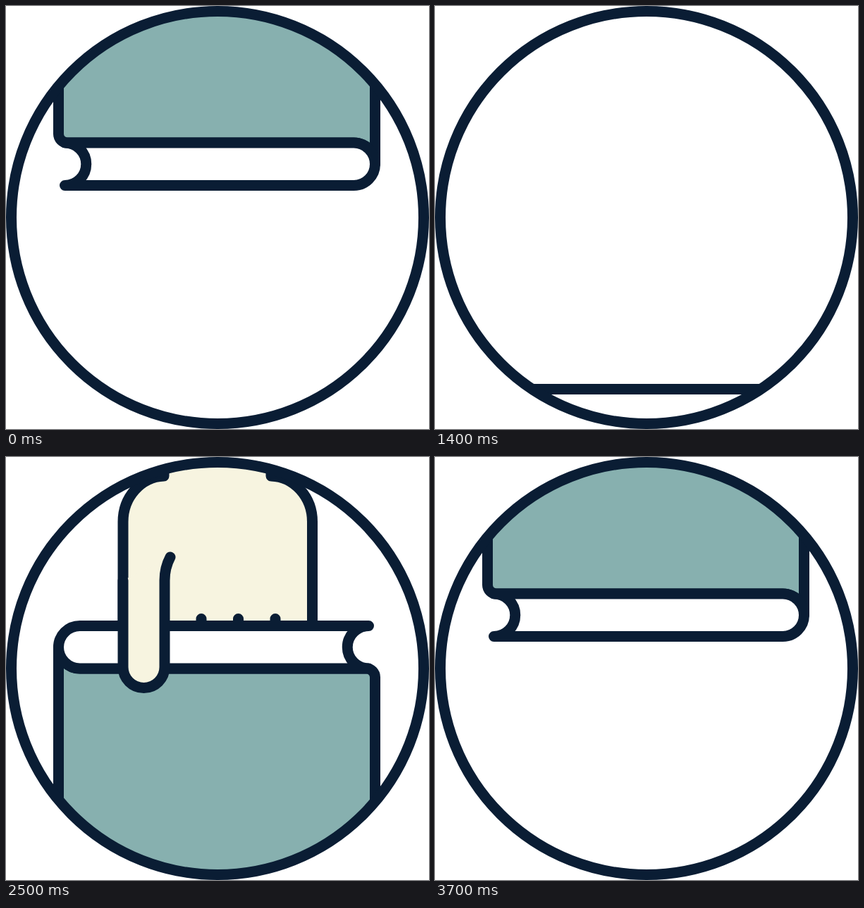
An HTML page for the animation above (3.8 s loop, 600 by 600 pixels).

```html
<!DOCTYPE html>
<html lang="en">
<head>
<meta charset="utf-8">
<title>Passing a book</title>
<style>
  html, body { margin: 0; height: 100%; overflow: hidden; background: #fff; }
  svg { display: block; width: 100vw; height: 100vh; }
  path, .ring { stroke: #0a1d34; stroke-width: 15; stroke-linecap: round; stroke-linejoin: round; }
  .skin { fill: #f7f4e0; }
  .cover { fill: #87b0af; }
  .page { fill: #fff; }
  .line, .ring { fill: none; }
</style>
</head>
<body>
<svg viewBox="0 0 600 600">
  <clipPath id="disc"><circle cx="300" cy="300" r="292.5"/></clipPath>
  <g clip-path="url(#disc)">
    <g id="scene">
      <g class="hand">
        <path class="skin" d="M224-600V27A60 65 0 0 0 166 92V298a29.5 29.5 0 0 0 59 0V393a26 26 0 0 0 52 0V417.5a26.25 26.25 0 0 0 52.5 0V379.5a26.25 26.25 0 0 0 52.5 0V333.5a26.25 26.25 0 0 0 52.5 0V92A60 65 0 0 0 376 27V-600"/>
        <path class="line" d="M277 229.5V400M329.5 229.5V400M382 229.5V350"/>
      </g>
      <g id="book">
        <path class="cover" d="M74.5 373.75A30.25 30.25 0 0 0 104.75 404H511a12.5 12.5 0 0 1 12.5 12.5V976a12.5 12.5 0 0 1-12.5 12.5H87A12.5 12.5 0 0 1 74.5 976Z"/>
        <path class="page" d="M514.5 343.5H104.75a30.25 30.25 0 0 0 0 60.5H514.5a30.25 30.25 0 0 1 0-60.5Z"/>
      </g>
      <g class="hand">
        <path class="skin" d="M166 175V298a29.5 29.5 0 0 0 59 0V175q0-18 8-33"/>
      </g>
    </g>
  </g>
  <circle class="ring" cx="300" cy="300" r="292.5"/>
</svg>
<script>
const STEP = 100, HALF = 19;      // the second half repeats the first, turned by 180 degrees
const GRAB = 4, PULL = 4.5, ENTER = 12, REST = 18;
const scene = document.getElementById('scene');
const book = document.getElementById('book');
const hands = document.querySelectorAll('.hand');

const ease = x => {
  x = Math.min(1, Math.max(0, x));
  return x * x * (3 - 2 * x);
};
const shift = (el, y) => el.setAttribute('transform', `translate(0 ${y})`);

function draw(now) {
  const step = Math.floor(now / STEP) % (2 * HALF);
  const k = step % HALF;
  const entering = k >= ENTER;
  const upright = (step >= HALF) !== entering;
  scene.setAttribute('transform', upright ? '' : 'rotate(180 299 299)');

  const pulled = 104 * (Math.max(0, k - PULL) / 1.5) ** 1.6;
  shift(book, entering ? 270 * (1 - ease((k - ENTER) / (REST - ENTER))) : -pulled);

  const handY = 104 - 539 * (1 - ease(k / GRAB)) - pulled;
  for (const hand of hands) {
    hand.style.display = k > 0 && !entering ? '' : 'none';
    shift(hand, handY);
  }
}

function loop() {
  draw(performance.now());
  requestAnimationFrame(loop);
}
loop();
</script>
</body>
</html>
```
